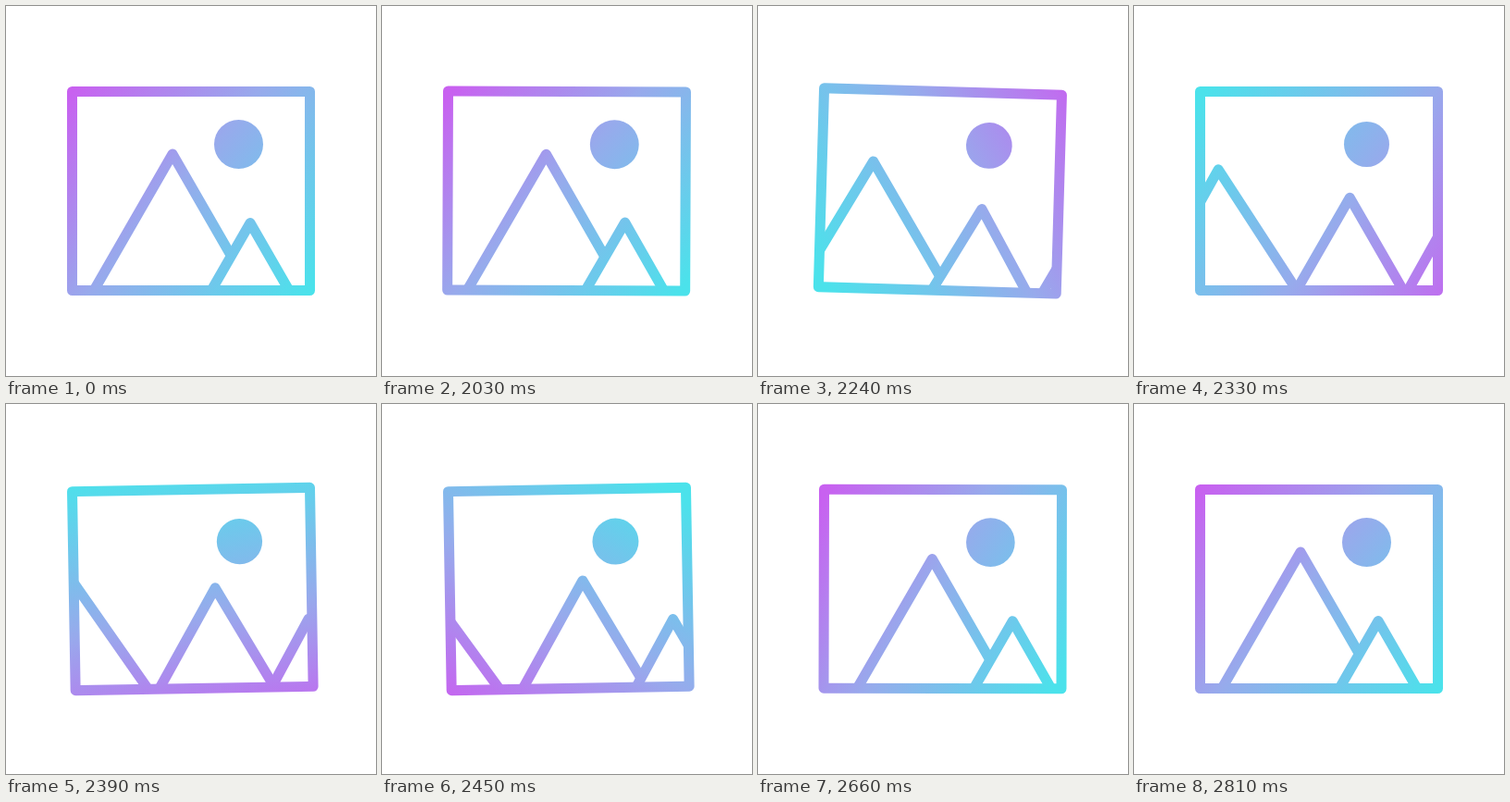
Write an HTML page that moves like this. It is 400 px wide and 400 px high and loops after 2.9 s.

```html
<!DOCTYPE html>
<html lang="en">
<head>
<meta charset="utf-8">
<title>Picture icon</title>
<style>
  html, body { margin: 0; width: 100%; height: 100%; overflow: hidden; background: #fff; }
  svg { display: block; width: 100%; height: 100%; }
</style>
</head>
<body>
<svg viewBox="0 0 400 400">
  <defs>
    <linearGradient id="tint" gradientUnits="userSpaceOnUse">
      <stop offset="0" stop-color="#c861f0"/>
      <stop offset=".46" stop-color="#97aaec"/>
      <stop offset="1" stop-color="#4be2eb"/>
    </linearGradient>
    <clipPath id="inside"><rect x="71.5" y="92.5" width="257" height="215"/></clipPath>
  </defs>
  <g id="picture" fill="#fff" stroke="url(#tint)" stroke-width="11" stroke-linejoin="round">
    <g clip-path="url(#inside)">
      <path class="hill"/>
      <path class="hill"/>
      <path class="hill"/>
    </g>
    <circle id="sun" cx="251.5" cy="149.5" fill="url(#tint)" stroke="none"/>
    <rect x="71.5" y="92.5" width="257" height="215" fill="none"/>
  </g>
</svg>
<script>
const LOOP = 2900, REST = 2000, STEP = 30, STEPS = 27;
const CENTER = 200, HALF_W = 128.5, HALF_H = 107.5, GROUND = 307.5;
const CORNER = Math.hypot(HALF_W, HALF_H);
const { PI, sin, cos, abs, min, max } = Math;

// Hill: left foot x, peak x, peak y, right foot x
const small = [222, 264, 234.5, 306];
const big = [95, 180, 160, 265];
const gone = [-115, -63, 206, 22];
const next = [339, 379, 234.5, 419];
const moves = [[big, gone], [small, big], [next, small]];

const picture = document.getElementById('picture');
const sun = document.getElementById('sun');
const tint = document.getElementById('tint');
const hills = document.querySelectorAll('.hill');

const mix = (a, b, u) => a + (b - a) * u;

// Easing of the hills and of the gradient's turn, u from 0 to 1
const slide = u => mix((1 - cos(PI * u)) / 2, u, .18);
const spin = u => 1 - (1 - u ** 1.85) ** 3.2;

// Degrees: a fading swing that quickens
const swing = step => 2.65 * max(0, 1 - step / 24.4) * sin(PI * (step / 11) ** 1.5);

// The gradient turns once, its purple end moving outwards on the way
function aimTint(turn) {
  const angle = Math.atan2(-HALF_H, -HALF_W) + turn * 2 * PI;
  const c = cos(angle), s = sin(angle);
  const edge = min(HALF_W / abs(c), HALF_H / abs(s));
  const reach = mix(edge, CORNER, .5);
  const purple = reach * (1 + .27 * sin(PI * turn));
  const ends = {
    x1: CENTER + c * purple, y1: CENTER + s * purple,
    x2: CENTER - c * reach, y2: CENTER - s * reach
  };
  for (const name in ends) tint.setAttribute(name, ends[name]);
}

function draw(time) {
  const step = min(STEPS, max(0, Math.floor((time % LOOP - REST) / STEP)));
  const u = step / STEPS, turn = spin(u);
  moves.forEach(([from, to], i) => {
    const [left, x, y, right] = from.map((v, j) => mix(v, to[j], slide(u)));
    hills[i].setAttribute('d', `M${left} ${GROUND}L${x} ${y}L${right} ${GROUND}`);
  });
  aimTint(turn);
  sun.setAttribute('r', 26.5 - 2 * sin(PI * turn));
  picture.setAttribute('transform', `rotate(${swing(step)} 200 92.5)`);
}

let start;
function tick(now) {
  start ??= now;
  draw(now - start);
  requestAnimationFrame(tick);
}
draw(0);
requestAnimationFrame(tick);
</script>
</body>
</html>
```
